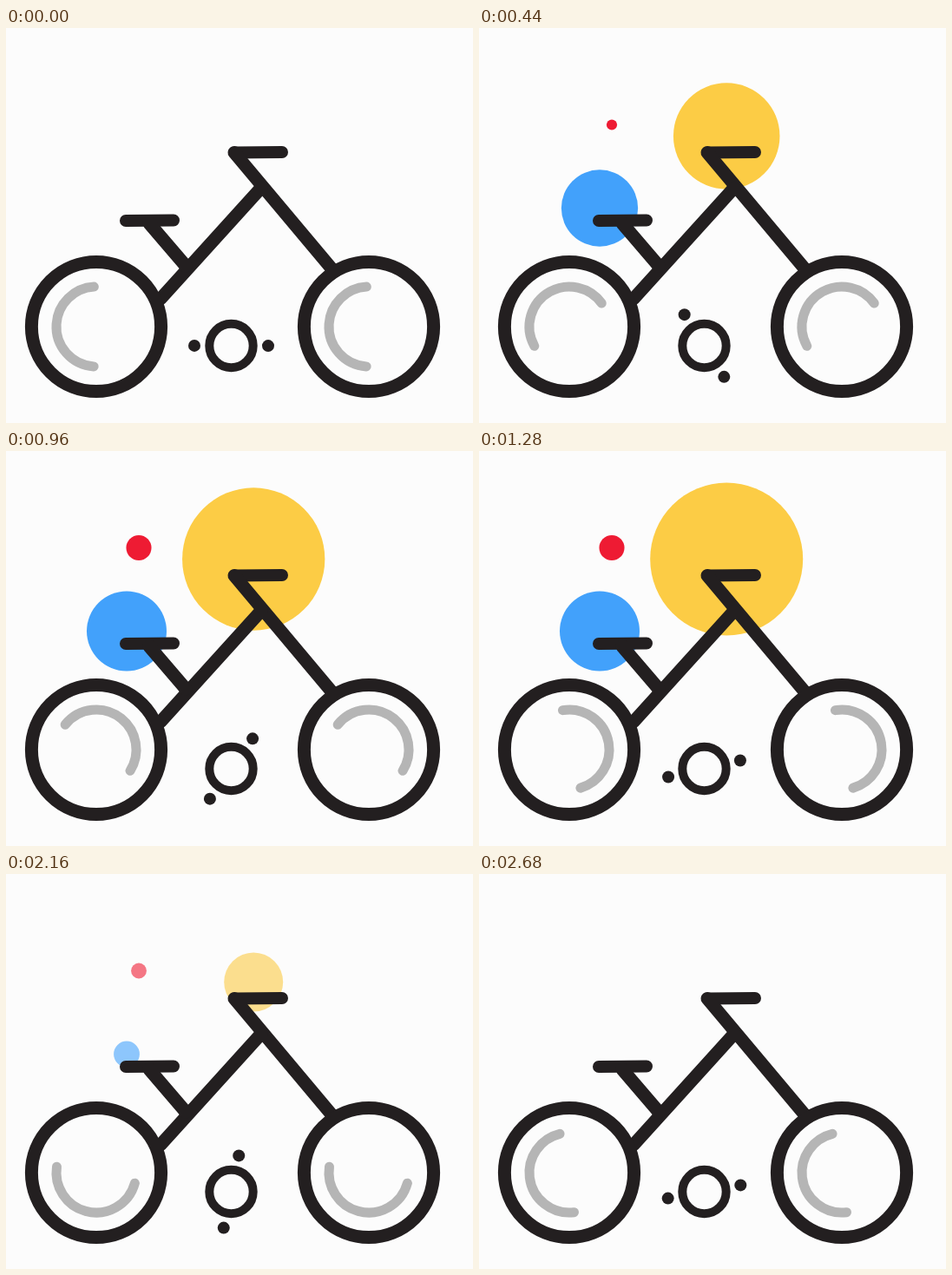
An HTML page with a canvas that plays this animation: 538 by 455 pixels, repeating every 2720 ms.

```html
<!DOCTYPE html>
<html lang="en">
<head>
<meta charset="utf-8">
<title>Bicycle</title>
<style>
html, body { margin: 0; height: 100%; overflow: hidden; background: #fcfcfc; }
canvas { display: block; }
</style>
</head>
<body>
<canvas id="stage" width="538" height="455"></canvas>
<script>
const ctx = document.getElementById('stage').getContext('2d');
const LOOP = 2720, TURN = 2760;
const FADE = [1950, 2470];
const INK = '#231f20', GREY = '#b5b5b5';

// pop: grow start/end, dip end; depth: size of the dip; out: shrink start/end
const balls = [
  { x: 285.2, y: 124.5, r: 88, color: '#fccc45', pop: [266, 542, 1120], depth: 0.115, out: [1746, 2466] },
  { x: 139, y: 207.5, r: 46, color: '#42a1fb', pop: [195, 475, 900], depth: 0.08, out: [1715, 2435] },
  { x: 153, y: 111.5, r: 16, color: '#ee1b33', pop: [307, 627, 1613], depth: 0.12, out: [1829, 2549] }
];

const progress = (t, a, b) => Math.min(1, Math.max(0, (t - a) / (b - a)));
const smooth = u => u * u * (3 - 2 * u);

function disc(x, y, r, color) {
  ctx.fillStyle = color;
  ctx.beginPath();
  ctx.arc(x, y, r, 0, 2 * Math.PI);
  ctx.fill();
}

function arc(x, y, r, width, color, from = 0, to = 2 * Math.PI) {
  ctx.strokeStyle = color;
  ctx.lineWidth = width;
  ctx.beginPath();
  ctx.arc(x, y, r, from, to);
  ctx.stroke();
}

function line(width, ...points) {
  ctx.strokeStyle = INK;
  ctx.lineWidth = width;
  ctx.beginPath();
  points.forEach(([x, y]) => ctx.lineTo(x, y));
  ctx.stroke();
}

function ball({ x, y, r, color, pop, depth, out }, t) {
  const grow = smooth(progress(t, pop[0], pop[1]));
  const dip = depth * Math.sin(Math.PI * progress(t, pop[1], pop[2])) ** 2;
  const leave = smooth(progress(t, ...out));
  ctx.globalAlpha = 1 - progress(t, ...FADE);
  disc(x, y, r * (grow - dip) * (1 - leave), color);
  ctx.globalAlpha = 1;
}

function wheel(x, y, angle) {
  arc(x, y, 46, 11, GREY, angle + Math.PI / 2 + 0.06, angle + Math.PI * 1.5 - 0.06);
  arc(x, y, 74.6, 15, INK);
}

function crank(x, y, angle) {
  arc(x, y, 25.2, 10, INK);
  for (const side of [-1, 1]) {
    disc(x + side * 42.5 * Math.cos(angle), y + side * 42.5 * Math.sin(angle), 7, INK);
  }
}

function draw(t) {
  const angle = t / TURN * 2 * Math.PI;
  ctx.fillStyle = '#fcfcfc';
  ctx.fillRect(0, 0, 538, 455);
  ctx.lineCap = ctx.lineJoin = 'round';
  balls.forEach(b => ball(b, t));
  line(14, [318, 143], [263, 143.5]);
  line(15, [263, 143.5], [375, 277]);
  line(15, [178, 312], [294, 184]);
  line(14, [138, 222], [193, 221.5]);
  line(15, [165, 225], [207, 274]);
  wheel(104, 344, angle);
  wheel(418, 344, angle);
  crank(259.5, 366, angle);
}

const start = performance.now();
function tick() {
  draw((performance.now() - start) % LOOP);
  requestAnimationFrame(tick);
}
tick();
</script>
</body>
</html>
```
